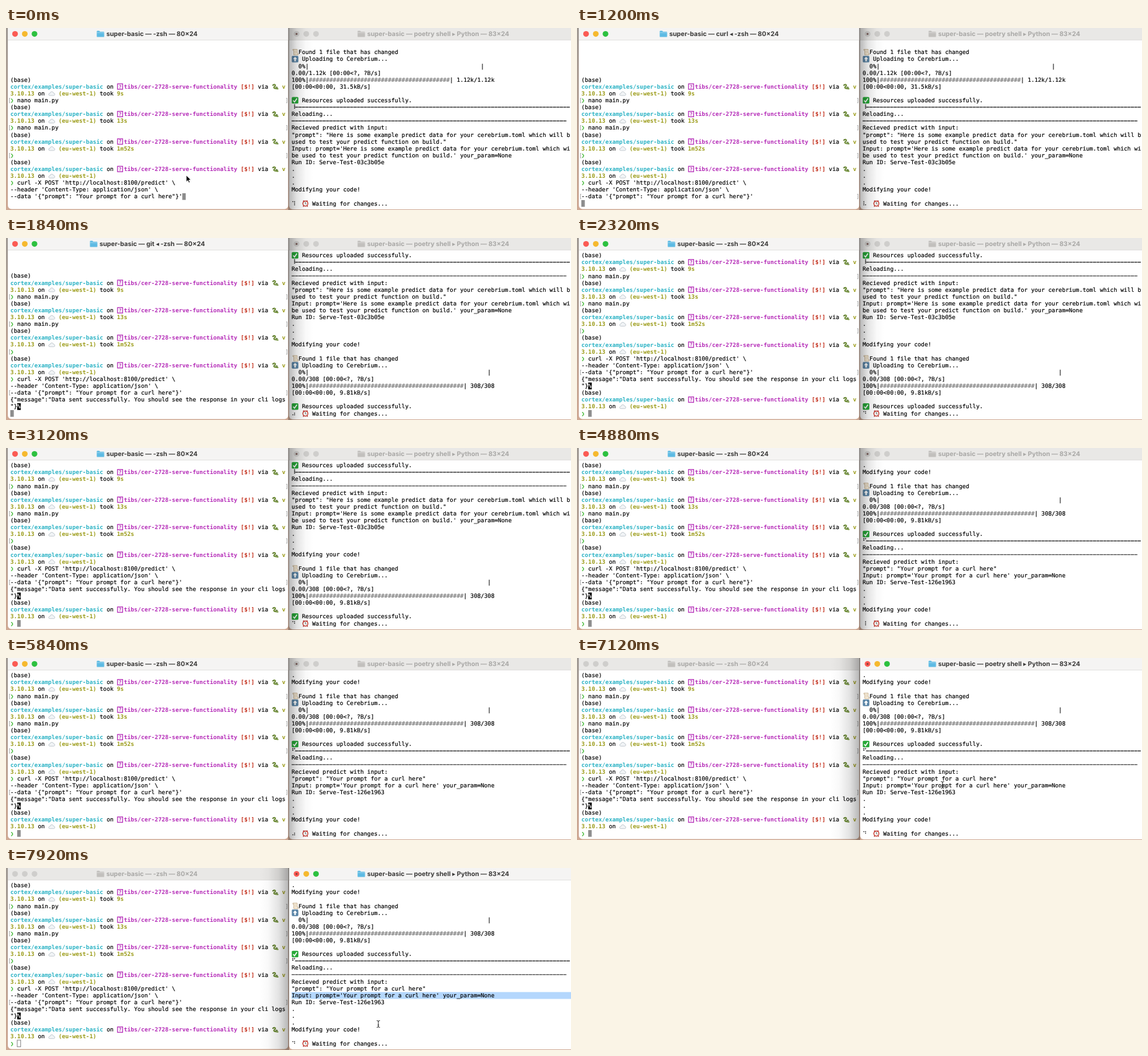
Animation, 912 px wide and 294 px high, one loop 8 s. Source, as an HTML page:

```html
<!DOCTYPE html>
<html lang="en">
<head>
<meta charset="utf-8">
<title>Terminal session</title>
<style>
html, body { margin: 0; width: 100%; height: 100%; overflow: hidden; background: #fff; }
svg { display: block; width: 912px; height: 294px; }
text { white-space: pre; text-rendering: geometricPrecision; }
.mono { font: 9.22px "DejaVu Sans Mono", "DejaVu Sans", monospace; }
.bold { font-weight: 700; }
.title { font: 700 10.25px Inter, "DejaVu Sans", sans-serif; }
</style>
</head>
<body>
<svg id="stage" viewBox="0 0 912 294" xmlns="http://www.w3.org/2000/svg"></svg>
<script>
const LOOP = 8000, CW = 5.55, LH = 11.1, BASE = 31.2;
const LEFT = 7, RIGHT = 461;
const INK = '#000', CYAN = '#2db3c5', PINK = '#b52db8', RED = '#c4321f',
      OLIVE = '#9c9c1a', GREEN = '#35b327';
const ENTER = 800, REPLY = 1600, FOUND = 1840, PROMPT = 2160, RELOAD = 3760,
      MOVE = 5920, FOCUS = 7120, SELECT = 7440;

const rowY = i => BASE + LH * i;
const esc = s => s.replace(/&/g, '&amp;').replace(/</g, '&lt;');
const label = (x, y, s, fill = INK, bold = false) =>
  `<text class="mono${bold ? ' bold' : ''}" x="${x.toFixed(2)}" y="${y.toFixed(2)}" fill="${fill}"${
    bold ? '' : ` stroke="${fill}" stroke-width=".18"`}>${esc(s)}</text>`;

// Small pictograms, drawn in an 11 x 11 box
const icons = {
  snake: `<path d="M2 3.4Q4.2 1.2 5.8 3.2Q6.4 4.6 4.4 5.8Q2.6 7.6 4.8 8.4L10 9.2" fill="none" stroke="#6d8c35" stroke-width="2.1" stroke-linecap="round"/>
    <path d="M6.4 7.2Q8.4 5.8 9.6 7.6" fill="none" stroke="#54702a" stroke-width="1.5"/>
    <circle cx="2.6" cy="3" r=".6" fill="#29351c"/>`,
  cloud: `<path d="M3 9Q.6 9 .7 7Q1 5.2 3 5.3Q3.4 2.6 6 2.7Q8.3 2.8 8.7 5Q10.9 5.2 10.8 7.2Q10.6 9 8.7 9Z" fill="#f1f4f6" stroke="#b9c1c7" stroke-width=".8"/>`,
  check: `<rect x=".3" y=".3" width="10.6" height="10.6" rx="1.6" fill="#27a838"/>
    <path d="M2.6 5.8L4.7 8.4L8.6 2.6" fill="none" stroke="#fff" stroke-width="1.6"/>`,
  up: `<rect x=".3" y=".3" width="10.6" height="10.6" rx="1.6" fill="#5d87a8"/>
    <path d="M5.6 1.8L9 5.6H6.8V9.2H4.4V5.6H2.2Z" fill="#fff"/>`,
  scroll: `<path d="M2 1H9V7.5H10.5V10H3.5V2.6H2Z" fill="#f8eedb" stroke="#b79c77" stroke-width=".7"/>
    <path d="M4.8 3.5H7.6M4.8 5.3H7.6M4.8 7.1H7.6" stroke="#d0bea0" stroke-width=".6"/>`,
  clock: `<path d="M2 2.6L3.6 1M9.2 2.6L7.6 1M3 9.4L2 10.8M8.2 9.4L9.2 10.8" stroke="#a92b25" stroke-width="1.6"/>
    <circle cx="5.6" cy="5.9" r="4.1" fill="#f7f7f5" stroke="#c83a31" stroke-width="1.4"/>
    <path d="M5.6 3.5V6L7.2 6.9" fill="none" stroke="#333" stroke-width=".8"/>`,
  unknown: `<rect x="1" y="1.2" width="8.2" height="8.8" fill="none" stroke="${PINK}" stroke-width="1.3"/>
    <text class="mono bold" x="2.6" y="8.6" fill="${PINK}" style="font-size:8px">?</text>`
};
const icon = (name, x, y) => `<g transform="translate(${x.toFixed(2)} ${(y - 8.8).toFixed(2)})">${icons[name]}</g>`;
const rule = (x, y, n) => `<path d="M${x.toFixed(2)} ${(y - 3.2).toFixed(2)}h${n * CW}"
  stroke="#111" stroke-width="1.1" stroke-dasharray="5.1 ${CW - 5.1}"/>`;

// A line is a list of [column, part, colour, bold]; a part is text, {icon} or {rule}
function part(x, y, item, fill, bold) {
  if (item.icon) return icon(item.icon, x, y);
  if (item.rule) return rule(x, y, item.rule);
  return label(x, y, item, fill, bold);
}
const line = (x0, i, parts) => `<g>${parts.map(([col, ...rest]) =>
  part(x0 + col * CW, rowY(i), ...rest)).join('')}</g>`;
const pic = name => ({ icon: name });
const plain = s => [[0, s]];

const dirLine = [
  [0, 'cortex/examples/super-basic', CYAN, true], [28, 'on'], [31, pic('unknown')],
  [33, 'tibs/cer-2728-serve-functionality', PINK, true], [67, '[$!]', RED, true],
  [72, 'via'], [76, pic('snake')], [79, 'v', OLIVE, true]
];
const envLine = took => [
  [0, '3.10.13', OLIVE, true], [8, 'on'], [11, pic('cloud')], [14, '(eu-west-1)', OLIVE, true],
  ...(took ? [[26, 'took'], [31, took, OLIVE, true]] : [])
];
const block = (took, cmd) => [plain('(base)'), dirLine, envLine(took), [[0, '❯', GREEN, true], [2, cmd]]];

const shell = [
  ...block('9s', 'nano main.py'),
  ...block('13s', 'nano main.py'),
  ...block('1m52s', ''),
  ...block('', "curl -X POST 'http://localhost:8100/predict' \\"),
  plain("--header 'Content-Type: application/json' \\"),
  plain(`--data '{"prompt": "Your prompt for a curl here"}'`),
  plain('{"message":"Data sent successfully. You should see the response in your cli logs'),
  [[0, '"}'], [2, '%', '#fff', true]],
  ...block('', '')
];

const dashes = { rule: 80 };
const upload = (size, gap, bar, rate) => [
  [[0, pic('scroll')], [2, 'Found 1 file that has changed']],
  [[0, pic('up')], [3, 'Uploading to Cerebrium...']],
  plain('  0%|' + ' '.repeat(gap) + '|'),
  plain(`0.00/${size} [00:00<?, ?B/s]`),
  [[0, '100%|'], [5, '#'.repeat(bar), '#777'], [5 + bar, `| ${size}/${size}`]],
  plain(`[00:00<00:00, ${rate}]`),
  [],
  [[0, pic('check')], [3, 'Resources uploaded successfully.']]
];
const run = (dot, body, id) => [
  [[0, dot], [1, dashes]], plain('Reloading...'), plain(dashes),
  plain('Recieved predict with input:'), ...body.map(plain), plain('Run ID: Serve-Test-' + id),
  plain('.'), plain('.'), plain('.'), plain('Modifying your code!'), []
];
const log = [
  [],
  ...upload('1.12k', 50, 41, '31.5kB/s'),
  ...run('⠸', [
    '"prompt": "Here is some example predict data for your cerebrium.toml which will b',
    'used to test your predict function on build."',
    "Input: prompt='Here is some example predict data for your cerebrium.toml which wi",
    "be used to test your predict function on build.' your_param=None"
  ], '03c3b05e'),
  ...upload('308', 52, 45, '9.81kB/s'),
  ...run('⠋', ['"prompt": "Your prompt for a curl here"',
    "Input: prompt='Your prompt for a curl here' your_param=None"], '126e1963')
];

const bracket = i => label(3, rowY(i), '[', '#aaa') + label(450.5, rowY(i), ']', '#aaa');
const dots = (id, x) => [0, 15.7, 31.4].map((d, i) =>
  `<circle id="${id}${i}" cx="${x + d}" cy="9.6" r="4.6"/>`).join('');
const folder = `<path d="M0 1.2Q0 0 1.2 0H4L5.4 1.4H10.8Q12 1.4 12 2.6V8.8Q12 10 10.8 10H1.2Q0 10 0 8.8Z"/>
  <path d="M0 3H12" stroke="#fff" stroke-opacity=".5" stroke-width=".8"/>`;
const bar = (id, x, w, dotX) => `<rect id="${id}Bar" x="${x}" width="${w}" height="19.5"/>
  <rect x="${x}" y="19" width="${w}" height=".7" fill="#d9d7d5"/>${dots(id + 'Dot', dotX)}
  <g id="${id}Folder">${folder}</g>
  <text id="${id}Title" class="title" y="13.4"></text>`;
const shade = (id, from, to) => `<linearGradient id="${id}" x1="${from}" x2="${to}">
  <stop stop-opacity=".3"/><stop offset=".35" stop-opacity=".11"/>
  <stop offset=".7" stop-opacity=".025"/><stop offset="1" stop-opacity="0"/></linearGradient>`;
const beam = '<path d="M-2.5 -5.5Q0 -5.5 0 -4V4Q0 5.5 -2.5 5.5M2.5 -5.5Q0 -5.5 0 -4M0 4Q0 5.5 2.5 5.5M-1.2 1.8H1.2" fill="none" stroke="#222" stroke-width="1"/>';

document.getElementById('stage').innerHTML = `
  <defs>
    <linearGradient id="desk" x2="0" y2="1"><stop stop-color="#a09a94"/><stop offset="1" stop-color="#cfa994"/></linearGradient>
    ${shade('fadeRight', 0, 1)}${shade('fadeLeft', 1, 0)}
    <clipPath id="view"><rect y="21.5" width="912" height="271"/></clipPath>
  </defs>
  <rect width="912" height="294" fill="url(#desk)"/>
  <rect x="3" y="-8" width="452.5" height="300.5" rx="6" fill="#fff"/>
  <rect x="457" y="-8" width="470" height="301" rx="6" fill="#fff"/>
  <g clip-path="url(#view)">
    <g id="shell">
      <rect id="caret" width="5.6" height="10.8"/>
      <rect id="mark" x="${LEFT + 2 * CW}" y="${rowY(19) - 8.6}" width="5.7" height="11" fill="#000"/>
      ${shell.map((p, i) => line(LEFT, i, p)).join('')}
      ${[3, 7, 11].map(bracket).join('')}<g id="ran">${bracket(17)}</g>
    </g>
    <rect id="pick" x="461" y="200.4" width="451" height="11.1" fill="#b4d7fd"/>
    <g id="log">${log.map((p, i) => line(RIGHT, i, p)).join('')}</g>
    <text id="spin" class="mono" x="${RIGHT}" y="${rowY(23)}" fill="${INK}"></text>
    ${line(RIGHT, 23, [[3, pic('clock')], [6, 'Waiting for changes...']])}
  </g>
  ${bar('l', 3, 452.5, 14.6)}${bar('r', 457, 455, 469)}
  <circle cx="469" cy="9.6" r="1.6" fill="#5a3532" fill-opacity=".75"/>
  <rect id="shadeRight" x="455.5" width="40" height="294" fill="url(#fadeRight)"/>
  <rect id="shadeLeft" x="409" width="48" height="294" fill="url(#fadeLeft)"/>
  <path id="arrow" d="M0 0V10.5L2.5 8.3L4.2 12L6 11.2L4.3 7.6H7.6Z" fill="#000" stroke="#fff" stroke-width=".8"/>
  <g id="beam">${beam}</g>`;

const $ = id => document.getElementById(id);
const set = (el, attrs) => { for (const k in attrs) el.setAttribute(k, attrs[k]); };
const show = (el, on) => { el.style.display = on ? '' : 'none'; };
const lines = id => [...$(id).children].filter(n => n.tagName === 'g' && n.id !== 'ran');
const shellLines = lines('shell'), logLines = lines('log');

function paintBar(id, active, x, title) {
  ['#fb5b54', '#f6b92f', '#2dc140'].forEach((c, i) => set($(id + 'Dot' + i), { fill: active ? c : '#cfcecc' }));
  set($(id + 'Bar'), { fill: active ? '#f5f4f3' : '#e9e8e6' });
  set($(id + 'Folder'), { fill: active ? '#5fbbe3' : '#c2c0bd', transform: `translate(${x - 15.5} 4.6)` });
  set($(id + 'Title'), { x, fill: active ? '#3a3938' : '#a9a8a6' });
  $(id + 'Title').textContent = title;
}

// [time, x, y] stops of the pointer
const path = [[0, 291, 238], [MOVE, 291, 238], [6160, 555, 214], [6400, 598, 203],
  [7040, 590, 205], [7520, 590, 205], [7840, 601, 252], [LOOP, 601, 252]];
function pointer(t) {
  const i = path.findIndex(p => p[0] > t), [t0, x0, y0] = path[i - 1], [t1, x1, y1] = path[i];
  const k = (t - t0) / (t1 - t0), e = k * k * (3 - 2 * k);
  return `translate(${x0 + (x1 - x0) * e} ${y0 + (y1 - y0) * e})`;
}

function shellState(t) {
  if (t < ENTER) return { top: -5, count: 18, row: 17, col: 50, x: 162, job: '' };
  if (t < REPLY) return { top: -5, count: 18, row: 18, col: 0, x: 149, job: 'curl ◂ ' };
  if (t < PROMPT) return { top: -3, count: 20, row: 20, col: 0, x: 151, job: 'git ◂ ' };
  return { top: 0, count: 24, row: 23, col: 2, x: 162, job: '' };
}

function draw(t) {
  const s = shellState(t), focusRight = t >= FOCUS, hollow = t >= FOCUS + 80;
  set($('shell'), { transform: `translate(0 ${-s.top * LH})` });
  shellLines.forEach((n, i) => show(n, i < s.count));
  show($('mark'), s.count > 19);
  show($('ran'), t >= ENTER);
  set($('caret'), {
    x: LEFT + s.col * CW, y: rowY(s.row) - 8.5,
    fill: hollow ? 'none' : '#8d8d8d', stroke: hollow ? '#777' : 'none', 'stroke-width': .9
  });

  const top = t < FOUND ? 0 : t < RELOAD ? 8 : 20;
  set($('log'), { transform: `translate(0 ${-top * LH})` });
  logLines.forEach((n, i) => show(n, i < top + 23));
  $('spin').textContent = '⠋⠙⠹⠸⠼⠴⠦⠧⠇⠏'[Math.floor((t + 200) / 80) % 10];
  show($('pick'), t >= SELECT);

  paintBar('l', !focusRight, s.x, `super-basic — ${s.job}-zsh — 80×24`);
  paintBar('r', focusRight, 583, 'super-basic — poetry shell ▸ Python — 83×24');
  show($('shadeRight'), !focusRight);
  show($('shadeLeft'), focusRight);

  show($('arrow'), t < ENTER || (t >= MOVE && !focusRight));
  show($('beam'), focusRight);
  set($(focusRight ? 'beam' : 'arrow'), { transform: pointer(t) });
}

function tick() {
  draw(performance.now() % LOOP);
  requestAnimationFrame(tick);
}
tick();
</script>
</body>
</html>
```
